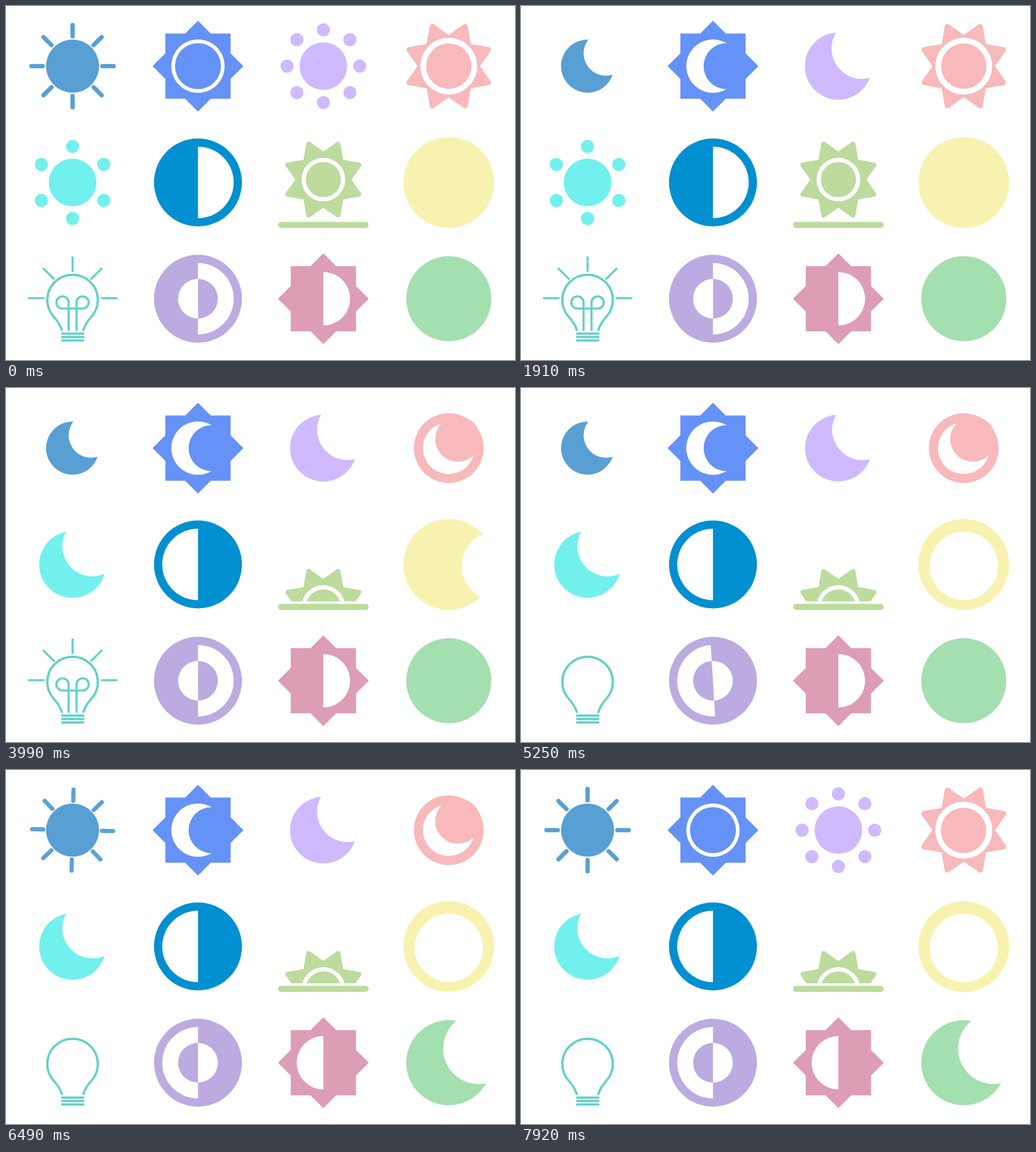
An HTML page with a canvas that plays this animation: 897 by 624 pixels, repeating every 8 s.

```html
<!DOCTYPE html>
<html lang="en">
<head>
<meta charset="utf-8">
<title>Theme toggles</title>
<style>
  html, body { margin: 0; width: 100%; height: 100%; overflow: hidden; background: #fff; }
  canvas { display: block; }
</style>
</head>
<body>
<canvas id="stage" width="897" height="624"></canvas>
<script>
const ctx = document.getElementById('stage').getContext('2d');
const LOOP = 8000, FIRST_CLICK = 615, CLICK_GAP = 464, ICONS = 12;
const WHITE = '#fff';

// Cubic bezier (0, 0, .15, 1.25): quick start, slight overshoot.
function ease(x) {
  if (x <= 0) return 0;
  if (x >= 1) return 1;
  let low = 0, high = 1;
  for (let i = 0; i < 24; i++) {
    const s = (low + high) / 2;
    if (0.45 * (1 - s) * s * s + s ** 3 < x) low = s; else high = s;
  }
  return 3.75 * (1 - low) * low * low + low ** 3;
}

// 0 = light, 1 = dark. Every icon is clicked in turn, then again from the first.
function progress(time, index, { duration = 500, delayOn = 0, delayOff = 0 } = {}) {
  const clicked = FIRST_CLICK + CLICK_GAP * index;
  const on = ease((time - clicked - delayOn) / duration);
  const off = ease((time - clicked - CLICK_GAP * ICONS - delayOff) / duration);
  return on - off;
}

const mix = (a, b, p) => a + (b - a) * p;
const clamp = v => Math.min(1, Math.max(0, v));

function disc(x, y, r, color) {
  ctx.fillStyle = color;
  ctx.beginPath();
  ctx.arc(x, y, Math.max(0, r), 0, 7);
  ctx.fill();
}

function rightHalf(r, color, flip = 1) {
  ctx.fillStyle = color;
  ctx.beginPath();
  ctx.arc(16, 16, r, -Math.PI / 2, Math.PI / 2, flip < 0);
  ctx.fill();
}

function around(angle, scale, draw) {
  ctx.save();
  ctx.translate(16, 16);
  ctx.rotate(angle * Math.PI / 180);
  ctx.scale(scale, scale);
  ctx.translate(-16, -16);
  draw();
  ctx.restore();
}

function stroke(path, color, width) {
  ctx.strokeStyle = color;
  ctx.lineWidth = width;
  ctx.lineCap = 'round';
  ctx.stroke(path);
}

function fill(path, color) {
  ctx.fillStyle = color;
  ctx.fill(path);
}

function dots(count, distance, color) {
  for (let i = 0; i < count; i++) {
    const a = i * 2 * Math.PI / count - Math.PI / 2;
    disc(16 + distance(i) * Math.cos(a), 16 + distance(i) * Math.sin(a), 2.3, color);
  }
}

const blockStar = new Path2D('M27.5 11.5v-7h-7L16 0l-4.5 4.5h-7v7L0 16l4.5 4.5v7h7L16 32l4.5-4.5h7v-7L32 16Z');
const bulb = new Path2D('M12.2 27C11.6 25.2 10.6 23.7 9.4 22.4A8.9 8.9 0 1 1 22.6 22.4C21.4 23.7 20.4 25.2 19.8 27');
const bulbBase = new Path2D('M12.3 28.3h7.5m-7.5 1.2h7.5m-7.5 1.2h7.5');
const bulbRays = new Path2D('M16 1.4v4.8M5.8 5.4l3.6 3.6M26.2 5.4l-3.6 3.6M.6 15.8h5.2M26.3 15.8h5.2');
const filament = new Path2D('M14.6 27V17.3a2.15 2.15 0 1 0-2.15 2.15h7.1a2.15 2.15 0 1 0-2.15-2.15V27');

const softStar = new Path2D();
{
  const point = (r, step) => {
    const a = step * Math.PI / 8;
    return [16 + r * Math.sin(a), 16 - r * Math.cos(a)];
  };
  softStar.moveTo(...point(11, 0));
  for (let i = 1; i < 16; i += 2) {
    softStar.arcTo(...point(16.82, i), ...point(11, i + 1), 0.9);
    softStar.lineTo(...point(11, i + 1));
  }
}

function classic(t, i, color) {
  const cut = progress(t, i, { duration: 400, delayOn: 100 });
  const rays = progress(t, i, { duration: 400, delayOff: 100 });
  disc(16, 16, 9.34, color);
  disc(mix(34.5, 22.5, cut), mix(1.5, 11.5, cut), 7.9, WHITE);
  ctx.globalAlpha = clamp(1 - rays);
  around(45 * rays, 1 - rays / 2, () => {
    for (let k = 0; k < 8; k++) {
      around(45 * k, 1, () => stroke(new Path2D('M16 5.5v-4'), color, 1.5));
    }
  });
  ctx.globalAlpha = 1;
}

function innerMoon(t, i, color) {
  const p = progress(t, i);
  around(90 * p, 1, () => fill(blockStar, color));
  disc(16, 16, 9.39, WHITE);
  disc(16 + 4.8 * p, 16, 8.1, color);
}

function expand(t, i, color) {
  const p = progress(t, i, { duration: 400, delayOff: 100 });
  const cut = progress(t, i, { duration: 400, delayOn: 100 });
  around(0, 1 - p / 4, () => dots(8, k => k % 2 ? 13.2 : 12.8, color));
  disc(16, 16, 8.4 * (1 + 0.4 * p), color);
  disc(mix(33.5, 24.5, cut), mix(-4.5, 9.5, cut), 10.7, WHITE);
}

function within(t, i, color) {
  const p = progress(t, i);
  around(0, 1 - 0.27 * p, () => fill(softStar, color));
  disc(16, 16, 10.5 + 1.8 * p, color);
  disc(16, 16, 10 - 0.9 * p, WHITE);
  disc(16 + 3.2 * p, 16 - 3.2 * p, 8, color);
}

function orbit(t, i, color) {
  const p = progress(t, i, { duration: 400, delayOff: 100 });
  const cut = progress(t, i, { duration: 400, delayOn: 100 });
  around(0, 1 - p / 4, () => dots(6, () => 12.7, color));
  disc(16, 16, 8.4 * (1 + 0.4 * p), color);
  disc(mix(35, 23, cut), mix(-5, 9.6, cut), 10.6, WHITE);
}

function darkSide(t, i, color) {
  around(-180 * progress(t, i), 1, () => {
    disc(16, 16, 15.5, color);
    rightHalf(12.6, WHITE);
  });
}

function horizon(t, i, color) {
  ctx.save();
  ctx.beginPath();
  ctx.rect(0, 0, 32, 29);
  ctx.clip();
  ctx.translate(0, 16 * progress(t, i) - 1);
  around(0, 0.9, () => fill(softStar, color));
  disc(16, 16, 7.7, WHITE);
  disc(16, 16, 6.2, color);
  ctx.restore();
  stroke(new Path2D('M1.1 30.95h29.8'), color, 2.15);
}

function eclipse(t, i, color) {
  const p = progress(t, i, { delayOn: 63 });
  disc(16, 16, 16, color);
  disc(48 - 32 * p, 16.5, 12.05, WHITE);
}

function lightbulb(t, i, color) {
  stroke(bulb, color, 0.8);
  stroke(bulbBase, color, 0.76);
  ctx.globalAlpha = clamp(1 - progress(t, i));
  stroke(bulbRays, color, 0.74);
  stroke(filament, color, 0.74);
  ctx.globalAlpha = 1;
}

function darkInner(t, i, color) {
  around(-180 * progress(t, i), 1, () => {
    disc(16, 16, 15.5, color);
    rightHalf(12.6, WHITE);
    rightHalf(7, color);
    rightHalf(7, WHITE, -1);
  });
}

function halfSun(t, i, color) {
  around(-180 * progress(t, i), 1, () => {
    fill(blockStar, color);
    rightHalf(9.4, WHITE);
  });
}

function simple(t, i, color) {
  const p = progress(t, i);
  disc(16, 16, 15, color);
  disc(mix(44.5, 26.5, p), mix(7, 11, p), 12.5, WHITE);
}

const icons = [
  [classic, '#589fd3'], [innerMoon, '#6592f6'], [expand, '#cfbaff'], [within, '#f8b9bb'],
  [orbit, '#72f0ee'], [darkSide, '#008fd0'], [horizon, '#bddb9d'], [eclipse, '#f8f2b0'],
  [lightbulb, '#62d0c6'], [darkInner, '#bbabe0'], [halfSun, '#dc9db5'], [simple, '#a4dfb0'],
];

const start = performance.now();

function frame() {
  const t = (performance.now() - start) % LOOP;
  ctx.fillStyle = WHITE;
  ctx.fillRect(0, 0, 897, 624);
  icons.forEach(([draw, color], i) => {
    ctx.save();
    ctx.translate(37.3 + 221 * (i % 4), 26 + 205 * Math.floor(i / 4));
    ctx.scale(5, 5);
    draw(t, i, color);
    ctx.restore();
  });
  requestAnimationFrame(frame);
}
frame();
</script>
</body>
</html>
```
